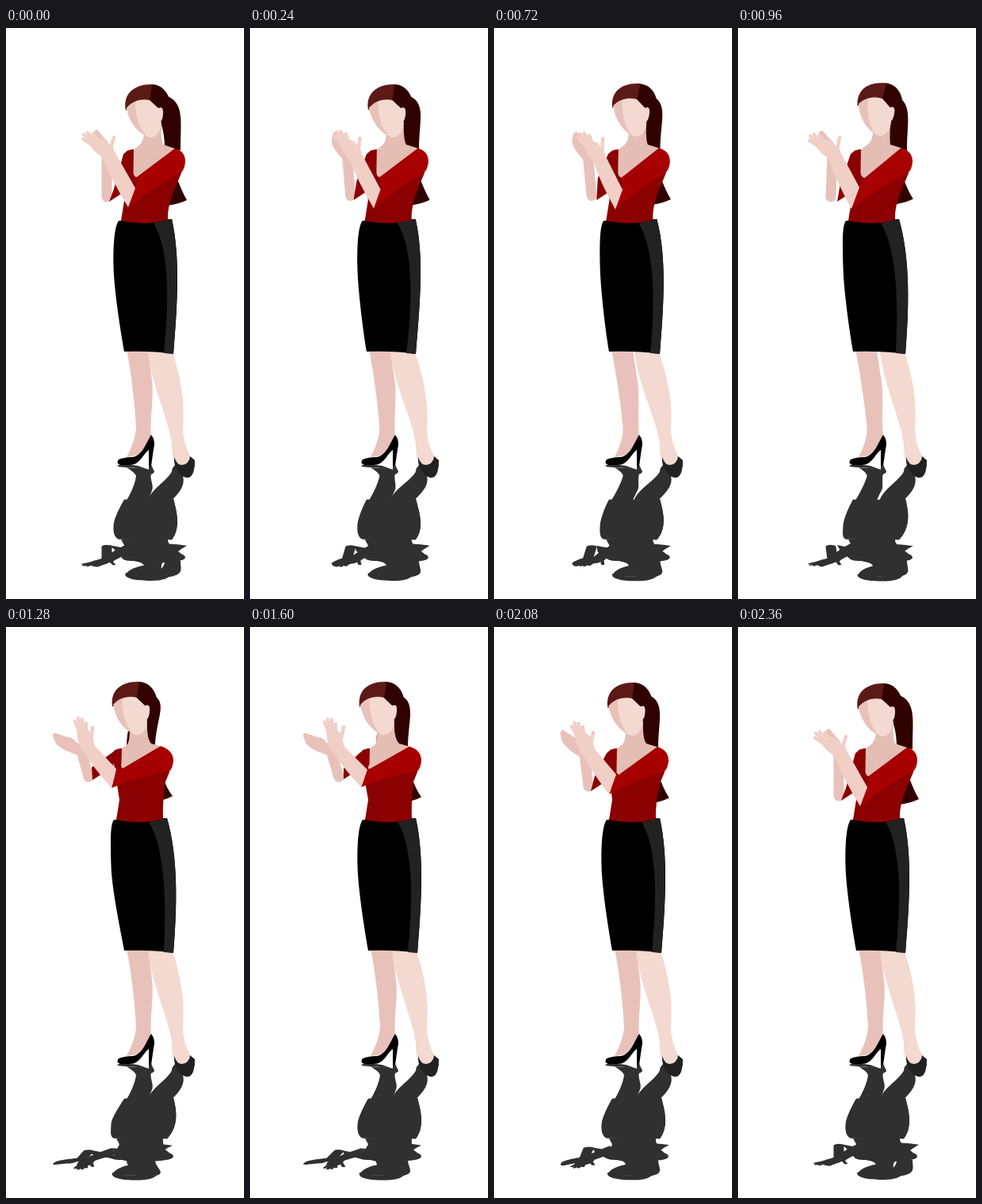
Animation of 300x720 px, one loop 2.4 s. Source, as an HTML page with a canvas:

```html
<!DOCTYPE html>
<html lang="en">
<head>
<meta charset="utf-8">
<title>Applause</title>
<style>
  html, body { margin: 0; height: 100%; overflow: hidden; background: #fff; }
  canvas { display: block; }
</style>
</head>
<body>
<canvas id="stage" width="300" height="720"></canvas>
<script>
const ctx = document.getElementById('stage').getContext('2d');
const LOOP = 2400, STEP = 40;
const LIGHT = '#f3d9cf', ARM = '#f0cfc6', SHADE = '#e8c2ba', NECK = '#e4bdb4';
const RED = '#a60000', DARK_RED = '#8b0000', HAIR = '#300300', CAP = '#5c1a16';

// Each track holds one value per pose; keys say which pose is reached when.
const keyTimes = [0, 480, 960, 1120, 1280, 1600, 2080, 2240, 2400];
const keyPoses = [0, 1, 2, 3, 3, 4, 5, 0, 0];

const body = {
  shoulder: [0, -3, -6, -15, -10, -6],
  waist: [0, -1, -6, -6, 0, 0],
  hemL: [0, -4, -4, 0, 0, 0],
  hemR: [0, -4, 0, 0, 0, 0],
  headX: [0, -4, -4, -18, -14, -8],
  headY: [0, 0, -2, -2, -2, -1],
  tilt: [0, 1, 6, 2, 2, 1],
  hairL: [200, 166, 190, 152, 159, 166],
  hairR: [220, 206, 213, 188, 199, 207],
  neckX: [165, 162, 160, 148, 151, 158],
  neckY: [188, 188, 189, 178, 179, 186]
};
const nearArm = {
  cuffX: [163, 166, 153, 139, 148, 154],
  cuffY: [202, 205, 201, 179, 180, 186],
  elbowX: [154, 158, 143, 133, 140, 145],
  elbowY: [226, 229, 228, 203, 202, 211],
  wristX: [128, 137, 121, 103, 110, 118],
  wristY: [156, 164, 158, 150, 151, 154],
  turn: [-35, -5, -35, 0, 0, -8],
  thumbX: [136, 141, 128, 109, 118, 125],
  thumbY: [138, 140, 138, 127, 126, 133]
};
const farArm = {
  wristX: [127, 118, 119, 95, 102, 114],
  wristY: [160, 164, 160, 156, 156, 160],
  tipX: [113, 100, 104, 60, 68, 85],
  tipY: [130, 134, 131, 136, 136, 132],
  elbowX: [127, 126, 117, 104, 112, 119],
  elbowY: [213, 210, 213, 189, 189, 201],
  cuffX: [136, 132, 129, 108, 118, 127],
  cuffY: [203, 183, 196, 177, 178, 188],
  endX: [130, 131, 125, 109, 118, 122],
  endY: [219, 215, 219, 193, 192, 207]
};

// Monotone cubic interpolation: smooth, with no overshoot at turning points.
function sample(track, time) {
  const count = keyTimes.length - 1;
  const value = i => track[keyPoses[i]];
  const slope = i => {
    const k = (i + count) % count;
    return (value(k + 1) - value(k)) / (keyTimes[k + 1] - keyTimes[k]);
  };
  const tangent = i => {
    const a = slope(i - 1), b = slope(i);
    return a * b > 0 ? 2 * a * b / (a + b) : 0;
  };
  let i = 0;
  while (time >= keyTimes[i + 1]) i++;
  const span = keyTimes[i + 1] - keyTimes[i];
  const u = (time - keyTimes[i]) / span, v = 1 - u;
  return value(i) * v * v * (1 + 2 * u) + value(i + 1) * u * u * (3 - 2 * u)
    + span * u * v * (tangent(i) * v - tangent(i + 1) * u);
}

const poseOf = (tracks, time) => Object.fromEntries(
  Object.entries(tracks).map(([name, track]) => [name, sample(track, time)]));

function drawFigure(b, near, far, tint) {
  const fill = (color, d) => {
    ctx.fillStyle = tint || color;
    ctx.fill(new Path2D(d));
  };
  const limb = (color, width, d) => {
    ctx.strokeStyle = tint || color;
    ctx.lineWidth = width;
    ctx.lineCap = 'round';
    ctx.stroke(new Path2D(d));
  };
  const { shoulder: s, waist: w, hemL, hemR, headX: hx } = b;

  // Ponytail
  fill(HAIR, `M${198 + hx} 84 C${226 + hx} 92 ${b.hairR} 115 ${b.hairR} 154
    L${b.hairL} 152 Q${b.hairL} 120 ${185 + hx} 100Z`);
  fill(HAIR, `M${214 + 1.2 * s} 185 Q${221 + 1.2 * s} 205 ${228 + 1.2 * s} ${217 + s / 4}
    Q${218 + 1.2 * s} ${222 + s / 4} ${203 + s} ${224 + s / 4}Z`);

  drawLegs(fill, hemL, hemR);

  // Skirt
  const mid = w / 2;
  const side = `L${211 + hemR} 411 C${216 + hemR} 350 ${220 + mid} 290 ${209 + w} 241Z`;
  fill('#000', `M${142 + w} 243 C${137 + w} 250 ${135 + mid} 270 ${135.5 + mid} 300
    S${145 + hemL} 385 ${149 + hemL} 408 Q${185 + hemL} 407 ${211 + hemR} 411 ${side}`);
  fill('#222', `M${186 + w} 246 C${207 + w} 280 ${205 + mid} 350 ${199 + hemR} 410 ${side}`);

  // Far arm
  limb(SHADE, 13, `M${far.wristX} ${far.wristY} L${far.elbowX} ${far.elbowY}`);
  fill(DARK_RED, `M${154 + s} 154 L${148 + s} 159 L${far.cuffX} ${far.cuffY}
    L${far.endX} ${far.endY} l26 -17Z`);
  ctx.save();
  ctx.translate(far.wristX, far.wristY);
  ctx.rotate(Math.atan2(far.tipY - far.wristY, far.tipX - far.wristX));
  const reach = Math.hypot(far.tipX - far.wristX, far.tipY - far.wristY);
  fill(SHADE, `M-3 -6 Q${reach * .55} -12 ${reach * .8} -8 L${reach} -2 Q${reach + 2} 1 ${reach} 3
    L${reach * .62} 6 Q${reach * .42} 10 ${reach * .28} 6 L-3 6Z`);
  ctx.restore();

  // Torso, neck and near sleeve
  const strapX = 213 + 1.2 * s, strapY = 152 + s / 8;
  const pitX = 221 + s;
  fill(DARK_RED, `M${161 + s} 153 Q${152 + s} 153 ${149 + s} 160 L${149 + w} 218 L${145 + w} 243
    Q${175 + w} 250 ${204 + w} 242 Q${203 + w} 222 ${216 + s} 195 L${pitX} 183 L${strapX} ${strapY}Z`);
  fill(NECK, `M${174 + hx} 130 Q${174 + hx} 143 ${168 + s} 148 L${161 + s} 153
    L${160.5 + s} ${b.neckY - 6} Q${b.neckX - 4} ${b.neckY} ${b.neckX} ${b.neckY}
    L${strapX} ${strapY} L${198 + s} 147 Q${195 + hx} 140 ${196 + hx} 118Z`);
  fill(RED, `M${strapX} ${strapY} Q${226 + s} 155 ${226 + s} 169 Q${225 + s} 178 ${pitX} 182
    Q${(pitX + near.elbowX) / 2} ${(182 + near.elbowY) / 2 - 5} ${near.elbowX} ${near.elbowY}
    L${near.cuffX} ${near.cuffY} L${b.neckX} ${b.neckY}Z`);

  drawHead(fill, b);

  // Near arm
  const { wristX: x, wristY: y } = near;
  fill(ARM, `M${near.cuffX} ${near.cuffY} L${near.elbowX} ${near.elbowY}
    Q${(near.elbowX + x) / 2 - 8} ${(near.elbowY + y) / 2 + 1} ${x - 8} ${y + 3}
    L${x + 9} ${y}Z`);
  limb(ARM, 4.5, `M${x + 4} ${y - 4} L${near.thumbX} ${near.thumbY}`);
  ctx.save();
  ctx.translate(x, y);
  ctx.rotate(near.turn * Math.PI / 180);
  fill(ARM, 'M-9 4 L-13 -10 L-14 -22 L-3 -24 L5 -16 L9 0 L6 8Z');
  limb(ARM, 4.2, 'M-11 -18 L-16 -31 M-8 -18 L-12 -35 M-5 -18 L-7 -34 M-2 -17 L-2 -29');
  ctx.restore();
}

function drawLegs(fill, hemL, hemR) {
  const calf = hemL * .7;
  fill(SHADE, `M${152 + hemL} 405 C${157 + hemL} 430 ${163 + calf} 475 ${164 + calf / 2} 505
    Q163 520 152 541 L166 539 Q178 532 183 514
    C181 495 ${186 + calf} 470 ${184.5 + calf} 450 Q${183 + hemL} 435 ${179 + hemL} 405Z`);
  fill(LIGHT, `M${178.5 + hemR} 405 C${183 + hemR} 450 206 495 209 525 Q209 545 215 551
    L228 551 L232 540 Q223 522 223 505 C226 470 ${220 + hemR} 440 ${209 + hemR} 405Z`);
  fill('#000', `M183 513 Q189 520 186 531 L183 552 H180 L180 532 C172 538 169 551 156 551
    H144 Q138 549 142 544 Q150 541 160 541 C172 539 176 524 183 513Z`);
  fill('#222', `M212 541 Q215 551 222 551 Q231 550 232 540 L238 545
    C238 556 236 567 229 567 C221 567 211 557 212 541Z`);
}

function drawHead(fill, { headX, headY, tilt }) {
  ctx.save();
  ctx.translate(183 + headX, 138 + headY);
  ctx.rotate(tilt * Math.PI / 180);
  ctx.translate(-183, -138);
  fill(HAIR, 'M183 71 C198 71 206 84 207 95 L200 125 L192 103 L180 92Z');
  fill(CAP, 'M151 104 C147 84 160 71 184 71 L181 92 Q163 89 151 104Z');
  fill(LIGHT, `M152 101 C160 91 172 89 181 91 L192 101 Q198 98 198 106 Q198 115 195 118
    C196 130 190 138 182 138 C170 136 155 118 152 101Z`);
  fill(SHADE, 'M152 101 Q157 95 163 93 C164 115 168 125 177 136 C164 131 154 115 152 101Z');
  ctx.restore();
}

function frame(now) {
  const time = Math.floor(now % LOOP / STEP) * STEP;
  const pose = [body, nearArm, farArm].map(tracks => poseOf(tracks, time));
  ctx.setTransform(1, 0, 0, 1, 0, 0);
  ctx.clearRect(0, 0, 300, 720);
  ctx.setTransform(1, 0, 0, -.304, 0, 718.6);
  drawFigure(...pose, '#303030');
  ctx.setTransform(1, 0, 0, 1, 0, 0);
  drawFigure(...pose);
  requestAnimationFrame(frame);
}
requestAnimationFrame(frame);
</script>
</body>
</html>
```
